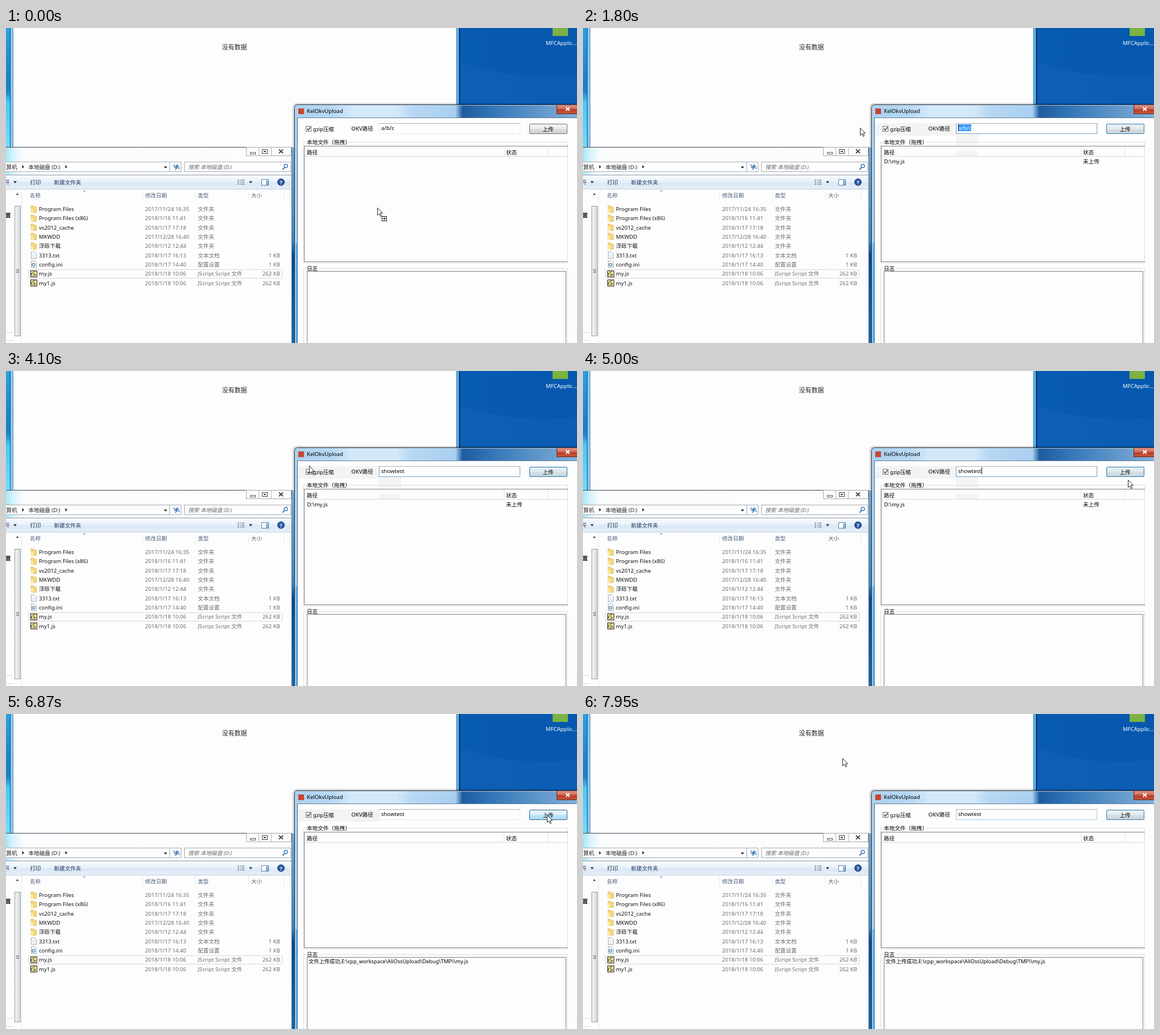
An HTML page for the animation above (8000 ms loop, 1006x556 px).

```html
<!DOCTYPE html>
<html lang="zh-CN">
<head>
<meta charset="utf-8">
<title>Upload demo</title>
<style>
  html, body { margin: 0; width: 100%; height: 100%; overflow: hidden; background: #fdfdfd; }
  svg { display: block; font: 9.6px 'Noto Sans', 'Noto Sans CJK SC', 'Noto Sans CJK', sans-serif; }
  text { white-space: pre; }
  rect { shape-rendering: crispEdges; }
</style>
</head>
<body>
<svg id="stage" width="1006" height="556" viewBox="0 0 1006 556"></svg>
<script>
const LOOP = 8000;
const stage = document.getElementById('stage');

// Markup helpers
const rect = (x, y, w, h, fill, more = '') =>
  `<rect x="${x}" y="${y}" width="${w}" height="${h}" fill="${fill}" ${more}/>`;
const box = (x, y, w, h, line, fill = 'none', more = '') =>
  rect(x + .5, y + .5, w - 1, h - 1, fill, `stroke="${line}" ${more}`);
const text = (x, y, s, fill = '#000', more = '') =>
  `<text x="${x}" y="${y}" fill="${fill}" ${more}>${s}</text>`;
const path = (d, stroke, fill = 'none', more = '') =>
  `<path d="${d}" stroke="${stroke}" fill="${fill}" ${more}/>`;
const down = (x, y) => path(`M${x - 3} ${y - 1.5}h6l-3 3.5z`, 'none', '#222');
const right = (x, y) => path(`M${x - 1.5} ${y - 3}v6l3.5-3z`, 'none', '#222');
const group = (id, body) => `<g id="${id}">${body}</g>`;
const gradient = (id, vertical, ...stops) =>
  `<linearGradient id="${id}" ${vertical ? 'x2="0" y2="1"' : ''}>` +
  stops.map(([at, c]) => `<stop offset="${at}" stop-color="${c}"/>`).join('') + '</linearGradient>';

const defs = `<defs>
  ${gradient('desk', false, [0, '#0452a8'], [.45, '#0b60b8'], [1, '#0658ae'])}
  ${gradient('edge', true, [0, '#2aa2e4'], [.48, '#1b7cc6'], [.54, '#1f86cf'], [.62, '#48c8f4'], [1, '#72dcfa'])}
  ${gradient('gap', true, [0, '#8fc4ec'], [.48, '#479fe0'], [.55, '#0c57a6'], [1, '#1c7bcc'])}
  ${gradient('glass', false, [0, '#a9d0f0'], [.14, '#b9d9f4'], [.2, '#d3e8f9'], [.36, '#d3e8f9'],
    [.41, '#b7d8f3'], [.565, '#a9cff0'], [.59, '#1d5c9e'], [.7, '#3577b8'], [1, '#86b2da'])}
  ${gradient('tools', true, [0, '#f8fbfe'], [.48, '#e6f0fa'], [.52, '#dce7f5'], [1, '#e4eff8'])}
  ${gradient('caption', false, [0, '#a5e6fa'], [.025, '#d6f3fc'], [.06, '#fbfcfd'], [1, '#fdfdfd'])}
  ${gradient('thumb', false, [0, '#f6f6f6'], [1, '#d6d6d8'])}
  ${gradient('close', true, [0, '#dd9a8d'], [.48, '#cd6651'], [.52, '#b53c25'], [1, '#c9583f'])}
  ${gradient('plain', true, [0, '#f4f4f4'], [.5, '#ebebeb'], [.52, '#dedede'], [1, '#d0d0d0'])}
  ${gradient('hot', true, [0, '#eaf6fd'], [.5, '#d9f0fc'], [.52, '#bee6fd'], [1, '#a8d9f5'])}
  ${gradient('down', true, [0, '#d5ebf7'], [.5, '#b8dcf0'], [.52, '#98ccea'], [1, '#79b5db'])}
</defs>`;

function desktop() {
  return rect(0, 0, 1006, 556, 'url(#desk)') +
    path('M800 60Q900 95 1006 80V136H800Z', 'none', '#1468be', 'opacity=".35"') +
    rect(963, 0, 27, 14, '#7cb342') +
    text(951, 30, 'MFCApplic...', '#fff');
}

function backWindow() {
  return rect(0, 0, 8, 210, 'url(#edge)') + rect(7, 0, 1, 210, '#1b4c80') +
    rect(8, 0, 4, 210, '#86c8f2') + rect(12, 0, 1, 210, '#6d8ca8') +
    rect(13, 0, 780, 211, '#fdfdfd') + rect(793, 0, 1, 136, '#6f93b5') +
    rect(794, 0, 4, 136, '#58aeee') + rect(798, 0, 2, 136, '#0b2f5c') +
    text(380.5, 38, '没有数据', '#222', 'font-size="11"');
}

function fileIcon(kind, y) {
  if (kind === 'folder')
    return path(`M44 ${y - 6}h4l2 2h3.500v9.500h-9.500z`, '#d9b04e', '#f4d67c', 'stroke-width=".7"') +
      path(`M44 ${y + 6}v-8l4 2v7z`, 'none', '#fbe9a8');
  if (kind === 'script')
    return box(43, y - 6, 12, 12, '#222', '#f3eb9c') +
      path(`M51.500 ${y - 3.500}q-5-1-4 2t4 2q2 3.500-4.500 2.500M45 ${y - 2}v5`, '#222');
  const page = path(`M44.500 ${y - 6}h6l3 3v9h-9z`, '#8c949c', '#fff', 'stroke-width=".8"');
  return page + (kind === 'ini'
    ? `<circle cx="48.500" cy="${y + 1}" r="2.600" fill="#d5e6f2" stroke="#5d89ab" stroke-width="1.300"/>`
    : path(`M46 ${y - 2}h5m-5 2h6m-6 2h6m-6 2h6`, '#c0c6cc', 'none', 'stroke-width=".6"'));
}

const files = [
  ['folder', 'Program Files', '2017/11/24 16:35'],
  ['folder', 'Program Files (x86)', '2018/1/16 11:41'],
  ['folder', 'vs2012_cache', '2018/1/17 17:18'],
  ['folder', 'MKWDD', '2017/12/28 16:40'],
  ['folder', '浮砾下载', '2018/1/12 12:44'],
  ['text', '3313.txt', '2018/1/17 16:13', '1 KB'],
  ['ini', 'config.ini', '2018/1/17 14:40', '1 KB'],
  ['script', 'my.js', '2018/1/18 10:06', '262 KB'],
  ['script', 'my1.js', '2018/1/18 10:06', '262 KB'],
];
const kinds = { folder: '文件夹', text: '文本文档', ini: '配置设置', script: 'JScript Script 文件' };

function explorer() {
  const grey = '#6d6d6d', head = '#4c607a';
  let s = rect(0, 210, 503, 346, '#fdfdfd') + rect(0, 211, 503, 48, 'url(#caption)') +
    rect(0, 210, 504, 1, '#3c4650') + rect(503, 210, 1, 346, '#46606f') +
    rect(504, 211, 5, 345, 'url(#gap)');

  // Caption buttons
  s += box(423, 210, 80, 16, '#a3a8ad', '#fdfdfd') + rect(445, 211, 1, 14, '#b4b8bc') +
    rect(467, 211, 1, 14, '#b4b8bc') + box(430, 219, 10, 4, '#555') +
    box(451, 214, 10, 8, '#444') + box(454, 217, 4, 2, '#444') +
    path('M481 214.500l7 6.500m0-6.500l-7 6.500', '#444', 'none', 'stroke-width="1.800"');

  // Address and search
  s += box(-4, 236, 293, 18, '#a5abb1', '#fdfdfd') + box(288, 236, 21, 18, '#a5abb1', '#fdfdfd') +
    box(314, 236, 188, 18, '#a5abb1', '#fdfdfd') +
    text(-9, 248.500, '计算机', '#222') + right(30, 245) + text(39.500, 248.500, '本地磁盘 (D:)', '#222') +
    right(106, 245) + down(281, 246) +
    path('M303 241l-4 3h6m-9 2h6l-4 4M296 241v3m9 2v3', '#2c6cb0', 'none', 'stroke-width="1.500"') +
    text(321, 248.500, '搜索 本地磁盘 (D:)', '#6a6a6a', 'font-style="italic"') +
    '<circle cx="493" cy="243.500" r="3" fill="none" stroke="#3d78b8" stroke-width="1.400"/>' +
    path('M491 246l-4 4', '#3d78b8', 'none', 'stroke-width="1.800"');

  // Command bar
  s += rect(0, 259, 503, 1, '#8d9aa6') + rect(0, 260, 503, 25, 'url(#tools)') +
    rect(0, 284, 503, 1, '#c3d0de') + text(-3, 276, '开', '#1e395b') + down(16, 272) +
    text(42.500, 276, '打印', '#1e395b') + text(84.500, 276, '新建文件夹', '#1e395b') +
    path('M408 268.500h3m-3 3.500h3m-3 3.500h3m2-7h2m-2 3.500h2m-2 3.500h2m1-7h4m-4 3.500h4m-4 3.500h4', '#66809c', 'none', 'stroke-width="1.400"') +
    down(431, 272) + box(450, 267, 13, 11, '#5e7f9f', '#fff') + rect(458, 269, 4, 8, '#7fb4df') +
    '<circle cx="484.500" cy="272" r="6" fill="#2b58a5" stroke="#1c3d78"/>' +
    text(482.300, 275.500, '?', '#fff', 'font-weight="700"');

  // Navigation pane and column headings
  s += rect(27, 285, 1, 271, '#dfe5ec') + path('M17.500 294.500h5l-2.500-3z', 'none', '#333') +
    box(15, 314, 11, 230, '#9a9da0', 'url(#thumb)') +
    path('M18 426.500h5m-5 2.500h5m-5 2.500h5', '#666') +
    text(-1, 333.500, '置', '#111', 'font-weight="700"') +
    rect(0, 537, 12, 1, '#d5dbe2') + rect(0, 551, 12, 1, '#d5dbe2') +
    path('M135.500 288.500h5l-2.500-2.500z', 'none', '#6a9fcb');
  for (const [x, label] of [[42, '名称'], [245, '修改日期'], [338, '类型'], [432, '大小']])
    s += text(x, 299, label, head);
  for (const x of [240, 333, 427, 489]) s += rect(x, 286, 1, 19, '#e6eaef');

  s += box(39, 426, 448, 16, '#d6d6d6', 'none', 'rx="2"');
  files.forEach(([kind, name, date, size = ''], i) => {
    const y = 319.500 + i * 16.33;
    s += fileIcon(kind, Math.round(y)) + text(58, y + 3.500, name, '#111') +
      text(245, y + 3.500, date, grey) + text(338, y + 3.500, kinds[kind], grey) +
      text(483, y + 3.500, size, grey, 'text-anchor="end"');
  });
  return s;
}

function dialog() {
  const logLine = '文件上传成功,E:\\cpp_workspace\\AliOssUpload\\Debug\\TMP\\\\my.js';
  return path('M506.500 556V141q0-7 7-7H1006', '#000', 'none', 'opacity=".18" stroke-width="3"') +
    path('M508.500 560V141.500q0-6 6-6H1010V560Z', '#16283a', 'url(#glass)') +
    path('M509.500 556V142q0-5.500 5-5.500H1006', '#e2f1fc', 'none', 'opacity=".7"') +
    rect(510, 380, 3, 176, '#5db4ee') + rect(513, 158, 493, 398, '#fdfdfd') +
    rect(513, 158, 493, 1, '#5f7e9a') + rect(513, 158, 1, 398, '#4e6f8c') +
    rect(515, 142, 10, 10, '#c8452f') + text(530, 150, 'KelOkvUpload') +
    box(970, 135, 40, 17, '#5c2a26', 'url(#close)') +
    path('M986.500 140l6.500 6m0-6l-6.500 6', '#fff', 'none', 'stroke-width="2"') +

    group('shade', rect(514, 168, 143, 22, '#f3f3f3')) +
    group('trail', rect(657, 187, 39, 20, '#f4f4f4')) +
    box(528, 173, 10, 10, '#777', '#fafafa') +
    path('M530.500 177.500l2 3 4-5.500', '#36457a', 'none', 'stroke-width="1.500"') +
    text(541, 182, 'gzip压缩', '#000', 'font-size="9.200"') + text(608.500, 181, 'OKV路径') +

    path('M530 201.500h-5.500V414.500H989.500V201.500H604', '#dcdcdc') +
    text(530, 205, '本地文件（拖拽）') + box(525, 208, 465, 205, '#7c828a', '#fdfdfd') +
    rect(989, 209, 1, 203, '#dcdcdc') +
    rect(526, 226, 463, 1, '#d8d8d8') + rect(877, 209, 1, 17, '#e2e2e2') +
    rect(954, 209, 1, 17, '#e2e2e2') + text(530, 223, '路径') + text(881, 223, '状态') +
    group('row', rect(657, 217, 39, 9, '#f4f4f4') + text(530.500, 239, 'D:\\my.js') + text(881, 239, '未上传')) +

    path('M530 424.500h-5.500V556M551 424.500H989.500V556', '#dcdcdc') + text(530, 428, '日志') +
    box(530, 429, 457, 140, '#7c828a', '#fdfdfd') +
    group('log', text(533, 440, logLine, '#000', 'font-size="9.250"')) +

    box(657, 168, 249, 19, '#e0e0e0', '#fefefe', 'id="edit"') +
    rect(657, 168, 249, 1, '#a9adb3') +
    rect(661, 170, 23, 12, '#3399ff', 'id="mark"') + text(661, 180, '', '#000', 'id="entry"') +
    rect(661, 170, 1, 12, '#000', 'id="caret"') +
    box(922, 169, 67, 18, '#707070', 'url(#plain)', 'id="button" rx="2"') +
    box(923, 170, 65, 16, '#48c4f2', '#bfe8fb', 'id="glow"') +
    text(945.500, 181.500, '上传');
}

const pointer = group('cursor',
  group('arrow', path('M.5.5V13.500L3.500 10.700L5.700 15.500L7.700 14.600L5.500 9.900H9.500Z', '#111', '#fff', 'stroke-width=".9"')) +
  group('plus', box(8, 15, 9, 9, '#111', '#fff') + path('M10 19.500h5m-2.500-2.500v5', '#111')) +
  group('beam', path('M-2.500-6.500h2l.5.5.5-.5h2M0-6V6M-2.500 6.500h2l.5-.5.5.5h2', '#111')));

stage.innerHTML = defs + desktop() + backWindow() + explorer() + dialog() + pointer;

// [time, value...] lists; the last entry already begun is in force
const moves = [
  [0, 654, 317], [990, 672, 245], [1110, 692, 177], [1260, 692, 172], [1380, 700, 176],
  [1530, 711, 179], [1680, 661, 178], [1800, 488, 176], [3980, 511, 172], [4100, 534, 167],
  [4250, 610, 157], [4370, 705, 159], [4490, 800, 162], [4610, 878, 165], [4730, 930, 168],
  [4880, 948, 178], [5000, 960, 192], [5120, 964, 202], [5240, 960, 194], [5360, 956, 185],
  [5480, 953, 178], [7670, -50, -50], [7820, 640, 130], [7950, 457, 78],
];
const typed = [[0, 'a/b/c'], [2350, 's'], [2470, 'sh'], [2740, 'sho'], [2860, 'show'],
  [3100, 'showt'], [3220, 'showte'], [3520, 'showtest']];
const editLine = [[0, '#ececec'], [1260, '#b9d3e8'], [1380, '#6fa6d0'], [6440, '#e2e6ea'], [7110, '#a8c8e0']];
const buttonLook = [[0, '#707070', 'plain'], [1680, '#3c7fb1', 'plain'], [5480, '#3c7fb1', 'hot'],
  [6440, '#2c628b', 'down'], [6570, '#2c628b', 'hot'], [7820, '#3c7fb1', 'plain']];

const at = (list, t) => list.findLast(step => step[0] <= t);
const $ = id => document.getElementById(id);
const show = (id, on) => $(id).setAttribute('visibility', on ? 'visible' : 'hidden');
const within = (t, a, b) => t >= a && t < b;

function caretOn(t) {
  if (t < 2350) return within(t, 1680, 2200);
  if (t < 3500) return true;
  return t < 6440 && Math.floor((t - 3500) / 530) % 2 === 0;
}

function draw(t) {
  const [, x, y] = at(moves, t);
  $('cursor').setAttribute('transform', `translate(${x} ${y})`);
  const beam = within(t, 1110, 1800);
  show('beam', beam);
  show('arrow', !beam);
  show('plus', t < 840);

  const selected = within(t, 1680, 2350);
  const entry = $('entry');
  entry.textContent = at(typed, t)[1];
  entry.setAttribute('fill', selected ? '#fff' : '#000');
  show('mark', selected);
  $('caret').setAttribute('x', selected ? 661 : Math.round(661 + entry.getComputedTextLength()));
  show('caret', caretOn(t));
  $('edit').setAttribute('stroke', at(editLine, t)[1]);

  const [, line, look] = at(buttonLook, t);
  $('button').setAttribute('stroke', line);
  $('button').setAttribute('fill', `url(#${look})`);
  const pulsing = within(t, 1680, 5480) || t >= 7820;
  $('glow').setAttribute('opacity', pulsing ? .25 + .2 * Math.sin(t / 320) : 0);

  show('row', within(t, 840, 6870));
  show('log', t >= 6870);
  show('shade', within(t, 1800, 7820));
  show('trail', within(t, 1110, 6870));
}

function tick() {
  draw(performance.now() % LOOP);
  requestAnimationFrame(tick);
}
tick();
</script>
</body>
</html>
```
